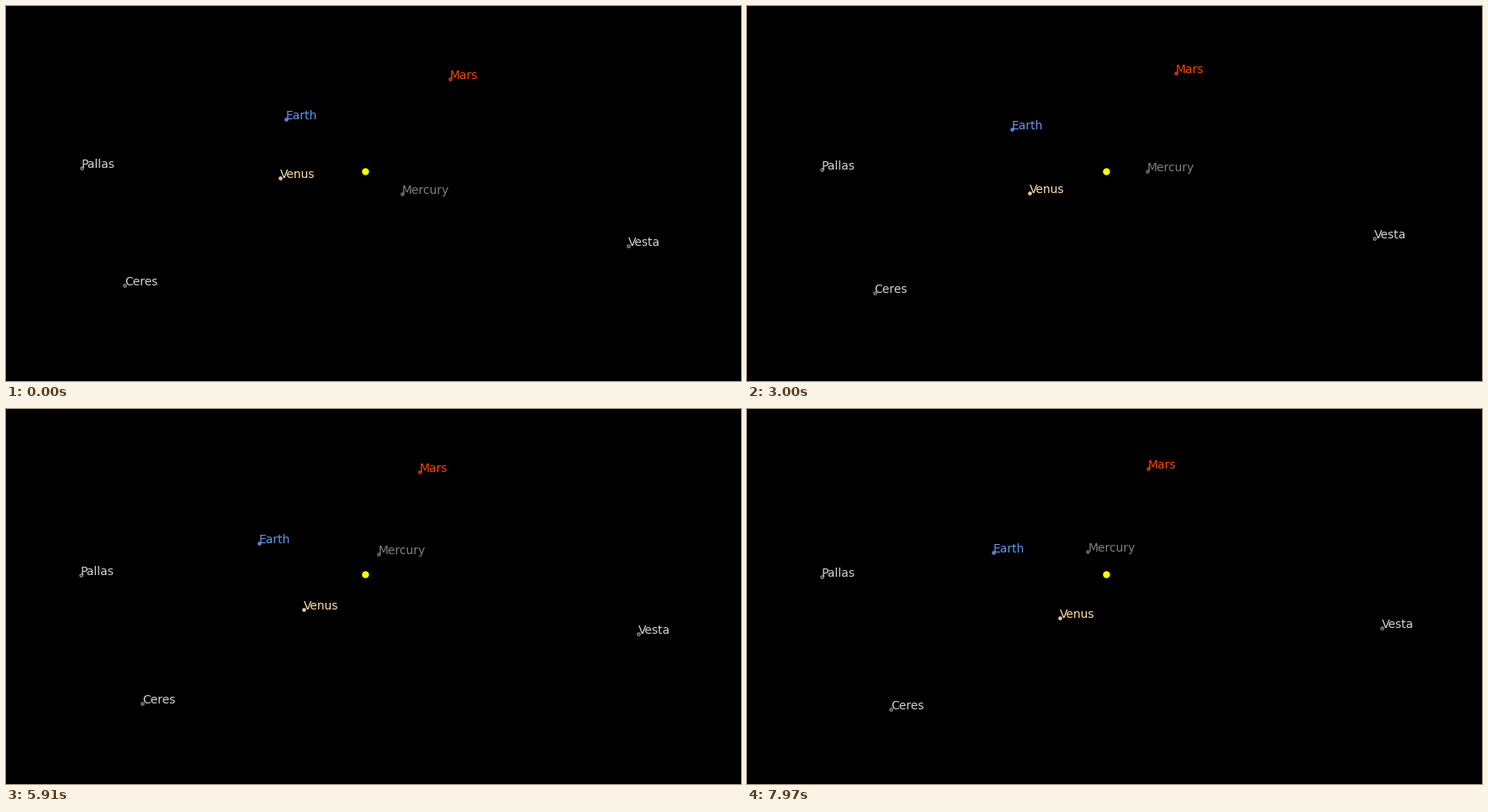
These frames come from a looping animation (874 by 447 pixels, 8000 ms). A matplotlib script:

```python
import numpy as np
import matplotlib.pyplot as plt
from matplotlib.animation import FuncAnimation
from matplotlib.colors import to_rgba

WIDTH, HEIGHT, DPI = 874, 447, 100
FRAMES, INTERVAL = 200, 40
STEPS = 102  # distinct poses per loop
SUN = 427, 197
MIDDLE = 0.505  # moment of the middle key point

plt.rcParams["font.family"] = "DejaVu Sans"


def arc(start, middle, end):
    """Smooth path through three points, for u in [0, 1]."""
    p, q, r = map(np.array, (start, middle, end))
    first = (q - p) / MIDDLE
    bend = (r - q) / (1 - MIDDLE) - first
    return lambda u: p + u * first + u * (u - MIDDLE) * bend


def inner_orbit(u, a=0.3871, e=0.2056, perihelion=np.radians(77.5)):
    """Kepler orbit around the sun, seen in a tilted plane."""
    mean = np.radians(-96.7 + 124 * u)
    ecc = mean
    for _ in range(8):
        ecc = mean + e * np.sin(ecc)
    z = a * (np.cos(ecc) - e + 1j * np.sqrt(1 - e * e) * np.sin(ecc))
    z *= np.exp(1j * perihelion)
    return SUN[0] + 141 * z.real, SUN[1] - 88.5 * z.imag + 11 * z.real


# name, colour, dot opacity, path
BODIES = [
    ("Mercury", "gray", 0.5, inner_orbit),
    ("Venus", "navajowhite", 0.8,
     arc((326, 205), (341.4, 229.3), (371.8, 249.4))),
    ("Earth", "cornflowerblue", 0.8,
     arc((333, 135.3), (309.2, 151.2), (292.6, 171))),
    ("Mars", "orangered", 0.5,
     arc((528, 87.3), (503.6, 78.3), (477, 71.3))),
    ("Ceres", "lightgray", 0.15,
     arc((141.2, 333.2), (155.4, 345.5), (171.3, 357.9))),
    ("Pallas", "lightgray", 0.15,
     arc((89.7, 192.6), (89, 196.3), (89.1, 200.1))),
    ("Vesta", "lightgray", 0.15,
     arc((740.2, 286.2), (748.3, 273.5), (755.2, 260.6))),
]

fig = plt.figure(figsize=(WIDTH / DPI, HEIGHT / DPI), dpi=DPI, facecolor="black")
ax = fig.add_axes([0, 0, 1, 1])
ax.set_xlim(0, WIDTH)
ax.set_ylim(HEIGHT, 0)
ax.axis("off")


def make_body(name, color, opacity, path):
    dot, = ax.plot([], [], "o", ms=2.4, mew=0.9,
                   mec=to_rgba(color, 0.6 + 0.4 * opacity),
                   mfc=to_rgba(color, opacity))
    label = ax.text(0, 0, name, color=color, fontsize=10,
                    ha="left", va="baseline")
    return dot, label, path


ax.plot(*SUN, "o", ms=5, mew=1, color="yellow")
bodies = [make_body(*body) for body in BODIES]


def update(frame):
    u = (frame * STEPS // FRAMES) / (STEPS - 1)
    artists = []
    for dot, label, path in bodies:
        x, y = path(u)
        dot.set_data([x], [y])
        label.set_position((x, y))
        artists += [dot, label]
    return artists


anim = FuncAnimation(fig, update, frames=FRAMES, interval=INTERVAL,
                     repeat=True, repeat_delay=0, blit=False)
plt.show()
```
